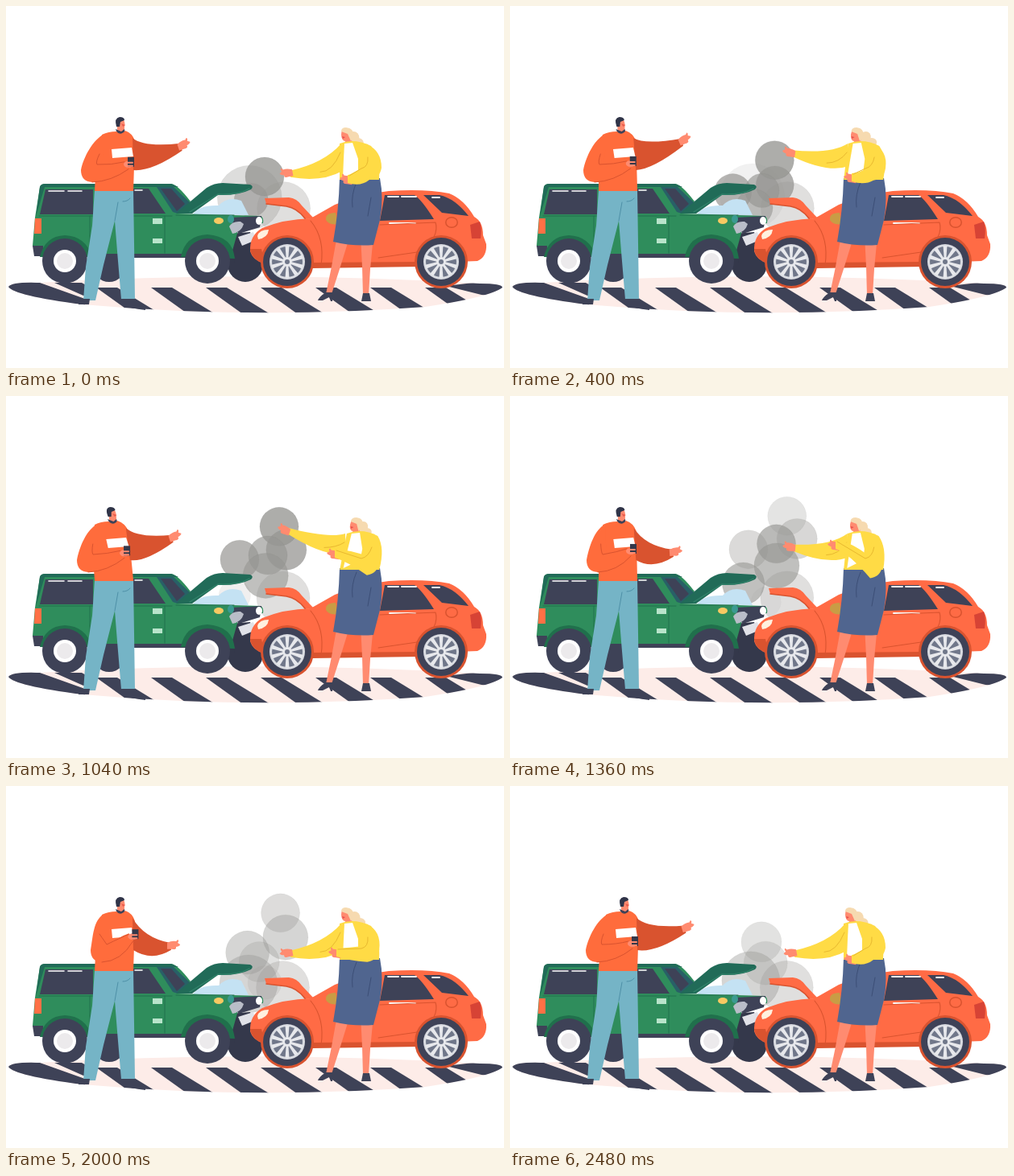
An HTML page with a canvas for the animation above (2.56 s loop, 618 px wide and 450 px high).

```html
<!DOCTYPE html>
<html lang="en">
<head>
<meta charset="utf-8">
<title>Roadside argument</title>
<style>
html, body { margin: 0; width: 100%; height: 100%; overflow: hidden; background: #fff; }
canvas { display: block; width: 618px; height: 450px; }
</style>
</head>
<body>
<canvas id="stage" width="618" height="450"></canvas>
<script>
const ctx = document.getElementById('stage').getContext('2d');
const LOOP = 2560, STEP = 80;
const DARK = '#3e4257', GREEN = '#2f8d5c', DEEP = '#216b58', RED = '#ff6b45';
const RUST = '#d9532f', SKIN = '#ff8b70', YELLOW = '#ffdb45', SWEATER = '#ff6c3c';
const HAIR = '#f6dab0';

function fill(color, path) {
  ctx.fillStyle = color;
  ctx.fill(new Path2D(path));
}
function line(color, width, path) {
  ctx.strokeStyle = color;
  ctx.lineWidth = width;
  ctx.lineCap = ctx.lineJoin = 'round';
  ctx.stroke(new Path2D(path));
}
function oval(color, x, y, rx, ry = rx) {
  ctx.fillStyle = color;
  ctx.beginPath();
  ctx.ellipse(x, y, rx, ry, 0, 0, 7);
  ctx.fill();
}
function within(transform, draw) {
  ctx.save();
  ctx.transform(...transform);
  draw();
  ctx.restore();
}
const place = (x, y, angle) =>
  [Math.cos(angle), Math.sin(angle), -Math.sin(angle), Math.cos(angle), x, y];
// Shear that keeps the waist still and moves the head sideways.
const lean = (dx, waist, height) => [1, 0, -dx / height, 1, dx * waist / height, 0];

const TIMES = [0, 400, 720, 1040, 1360, 2000, 2480];
const MAN = {
  tilt: [0, -5, -11, -11, -4.5, 0, 0],
  elbow: [93, 91, 89, 88, 95, 105, 94],
  handX: [228, 224, 220, 217, 213, 215, 228],
  handY: [171, 164, 156, 173, 194, 199, 174]
};
const LADY = {
  tilt: [0, 7, 11, 11, 6, 0, 0],
  handY: [210, 182, 159, 165, 188, 210, 210],
  restX: [416, 416, 414, 400, 396, 402, 416],
  restY: [216, 214, 210, 197, 186, 208, 216],
  swing: [1, 8, 9, 2, 1, 4, 2]
};

// Smooth curve through looping keys.
function tween(values, t) {
  const n = TIMES.length;
  const time = i => TIMES[(i + n) % n] + LOOP * Math.floor(i / n);
  const value = i => values[(i + n) % n];
  const slope = i => (value(i + 1) - value(i - 1)) / (time(i + 1) - time(i - 1));
  let i = n - 1;
  while (TIMES[i] > t) i--;
  const span = time(i + 1) - time(i), u = (t - time(i)) / span, v = 1 - u;
  return value(i) * v * v * (1 + 2 * u) + value(i + 1) * u * u * (3 - 2 * u)
    + span * u * v * (slope(i) * v - slope(i + 1) * u);
}
const poseAt = (keys, t) =>
  Object.fromEntries(Object.entries(keys).map(([name, values]) => [name, tween(values, t)]));

// birth, end, from x, from y, to x, to y, radius, opacity
const PUFFS = [
  [-600, 600, 305, 242, 300, 235, 40, .32],
  [-600, 3100, 345, 252, 343, 250, 33, .3],
  [-400, 320, 303, 246, 305, 238, 21, .95],
  [80, 1600, 318, 240, 362, 168, 25, .75],
  [-400, 1520, 313, 234, 346, 143, 24, .78],
  [40, 1600, 268, 250, 300, 182, 24, .7],
  [160, 2240, 308, 242, 344, 149, 24, .66],
  [240, 2320, 298, 258, 354, 178, 28, .6],
  [1000, 2320, 283, 250, 304, 196, 27, .6],
  [1300, 2960, 318, 260, 310, 172, 25, .28],
  [1600, 2960, 303, 250, 297, 238, 36, .4],
  [1900, 2960, 322, 250, 314, 200, 27, .28]
];

function smoke(t) {
  for (const [birth, end, x0, y0, x1, y1, size, opacity] of PUFFS) {
    if (t <= birth || t >= end) continue;
    const age = t - birth, u = age / (end - birth), e = u * (1.2 - .2 * u);
    const alpha = opacity * Math.min(1, age / 160, (end - t) / 480);
    const r = size * Math.min(1, .7 + .3 * age / 400);
    oval(`rgba(151,150,147,${alpha})`, x0 + (x1 - x0) * e, y0 + (y1 - y0) * e, r);
    ctx.strokeStyle = `rgba(130,129,126,${alpha * .35})`;
    ctx.lineWidth = .7;
    ctx.stroke();
  }
}

function road() {
  const shape = 'M3 349Q7 343 40 344Q310 328 588 345Q616 345 616 350Q600 362 520 374Q310 390 95 371Q10 360 3 349Z';
  fill('#fdece8', shape);
  ctx.save();
  ctx.clip(new Path2D(shape));
  fill(DARK, 'M0 340L42 344L98 364V375L0 365ZM60 344H94L108 352V359L96 360ZM546 348L580 344L620 345V362L590 359Z');
  for (let x = 112; x < 560; x += 68) fill(DARK, `M${x} 350h26l54 33h-34Z`);
  ctx.restore();
}

function plainWheel(x, y) {
  oval(DARK, x, y, 28);
  oval('#fff', x, y, 14);
  oval('#eceaec', x, y, 10);
}

function alloyWheel(x, y) {
  oval(RUST, x, y, 33);
  oval(DARK, x, y, 30);
  oval('#d9dbe1', x, y, 22);
  oval('#70778a', x, y, 19);
  for (let i = 0; i < 10; i++) {
    within(place(x, y, i * Math.PI / 5), () => fill('#e7e8ec', 'M-1 0L-2.5 -20H2.5L1 0Z'));
  }
  oval('#e7e8ec', x, y, 6);
  oval('#70778a', x, y, 3);
}

function greenCar() {
  oval(DARK, 128, 322, 21);
  oval('#34384b', 297, 321, 22);
  fill('#34384b', 'M277 283L303 281L318 320H284Z');
  fill('#c4e2f3', 'M232 259Q240 247 264 248Q275 236 292 242L301 260Z');
  fill(GREEN, 'M42 225Q43 221 49 221H205Q213 222 229 243L213 258L316 261Q320 263 319 270L290 272L281 304L277 312H45L33 298L36 263Z');
  fill(DEEP, 'M42 225Q43 221 49 221H205L214 225H48L37 262Z');
  fill(DARK, 'M49 228H108V259H42ZM152 227H177L198 258H152Z');
  fill('#286067', 'M187 225H208L229 245L213 258L207 256Z');
  fill(DARK, 'M192 227H205L222 246L212 255Z');
  line('#fff', 1.6, 'M53 230H72M77 230H94M160 229H169');
  line('#20704c', 1, 'M41 261H206M197 261V307M104 261V307M211 260H283');
  fill('#b8e4cb', 'M182 264h12v7h-12ZM182 289h12v6h-12Z');
  fill('#ff7045', 'M36 264H44V283H35Z');
  fill(DARK, 'M33 298H46V311H35ZM102 308H225V313H102Z');
  fill('#20704c', 'M42 312Q48 286 73 285Q99 286 107 312ZM217 312Q222 285 250 284Q281 286 284 314Z');
  plainWheel(73, 317);
  plainWheel(250, 317);
  fill(DARK, 'M281 263L317 261L315 275L289 283L281 274Z');
  oval('#f8c962', 264, 267, 6, 4);
  oval('#3b9a91', 279, 265, 4, 5);
  oval('#fff', 314, 267, 4, 5);
  fill('#b9bdc8', 'M277 274Q281 267 291 268L295 271Q292 281 281 283Z');
  fill('#e1e2e8', 'M288 287L307 281L310 291L293 298Z');
  fill(DEEP, 'M211 258L249 226Q258 220 269 220L303 222Q308 224 304 228Q288 236 263 235L231 258Z');
  line('#31836a', 1.4, 'M228 256L263 234Q288 235 302 227');
}

function redCar() {
  fill(RED, 'M303 305Q302 285 318 276Q345 265 378 264L408 247Q440 234 475 230Q520 227 550 233Q568 240 581 262Q592 268 592 285L596 296Q597 312 585 317L380 325L320 320Q306 316 303 305Z');
  fill(RED, 'M321 239L351 238Q361 239 367 248L382 264L371 265Q362 251 348 249L323 246Z');
  line(RUST, 1.6, 'M323 246L348 249Q361 251 371 264');
  fill(DARK, 'M470 235H507Q516 241 531 265L464 267ZM518 235H538Q557 239 574 261L541 257Z');
  line('#fff', 1.8, 'M474 237H487M491 237H509M476 270H508M529 238H538');
  line(RUST, 1.1, 'M464 272L533 269Q538 285 517 305L462 313M378 267Q396 289 391 322');
  oval(RUST, 553, 269, 8, 7);
  oval(RED, 553, 269, 6.5, 5.5);
  fill('#d74335', 'M576 272L588 268Q591 277 589 289H578Z');
  fill(RUST, 'M379 319L513 318V324L380 326ZM303 302H317L321 320Q305 316 303 302Z');
  fill('#fff1df', 'M312 286Q314 278 326 278Q325 288 313 290Z');
  alloyWheel(349, 318);
  alloyWheel(540, 318);
  fill('#c99c45', 'M397 263Q398 257 409 257L412 271Q401 273 397 266Z');
}

function hand(x, y, angle, flip = 1) {
  within(place(x, y, angle), () => {
    ctx.scale(1, flip);
    fill(SKIN, 'M-15 -4Q-9 -7 -4 -6L-2 -8Q0 -7 -2 -4L1 -2Q1 0 -4 1Q-3 5 -9 4H-15Z');
  });
}

function man({ tilt, elbow, handX, handY }) {
  fill('#75b4c6', 'M110 229H158L159 295L160 365H143L138 305L135 267L121 322L111 366H96L99 324L107 273Z');
  line('#4e90a7', 1, 'M135 267L139 244M154 239Q151 243 145 243');
  fill(DARK, 'M96 364H104L103 371H90Q90 367 96 364ZM143 364H160L173 374V378Q154 376 143 371Z');
  const sx = tilt * .75, ey = 109 + .45 * handY;
  const angle = Math.atan2(handY - ey, handX - 183 - sx);
  within(lean(tilt, 229, 84), () => {
    fill(SKIN, 'M138 148H147V159H138Z');
    oval(SKIN, 143, 147, 4.5, 7);
    fill('#303448', 'M137 150Q134 139 141 138Q147 138 147 142L142 144L141 150Z');
    fill('#e95c4d', 'M143 146L148 148L145 150Z');
    fill(DARK, 'M136 153L143 156L147 153L148 160L139 161Z');
    fill(SWEATER, 'M119 160Q127 156 137 156Q142 162 148 155Q157 158 160 168L158 230H110L112 190Z');
  });
  const wx = handX - 12 * Math.cos(angle), wy = handY - 12 * Math.sin(angle);
  fill(RUST, `M${157 + sx} 164Q${171 + sx} ${ey - 10} ${wx} ${wy - 4}L${wx + 2} ${wy + 5}Q${181 + sx} ${ey + 20} ${158 + sx * .5} 204Z`);
  hand(handX, handY, angle);
  within(lean(tilt, 229, 84), () => fill('#fff', 'M131 178L156 176L158 187L132 189Z'));

  const px = 155 + tilt * .45 + Math.max(0, elbow - 96) * .6;
  const py = 193 + tilt * .5 - (elbow - 94) * .8;
  fill(SWEATER, `M${122 + sx} 159C${108 + sx} 166 ${elbow + 3} 188 ${elbow} 204Q${elbow} 218 ${elbow + 14} 219Q${elbow + 38} 218 ${px - 3} ${py + 9}L${px - 8} ${py - 1}Q${elbow + 33} ${py + 4} ${elbow + 25} 197L${122 + sx} 179Z`);
  line(RUST, 1, `M${116 + sx} 184Q${elbow + 18} 194 ${elbow + 20} 197Q${elbow + 38} ${py + 4} ${px - 8} ${py}M${elbow + 14} 219Q${elbow + 38} 218 ${px - 3} ${py + 9}`);
  oval(SKIN, px - 3, py + 3, 6, 4);
  ctx.fillStyle = '#353849';
  ctx.fillRect(px - 4, py - 6, 8, 12);
  line(SKIN, 2, `M${px - 5} ${py + 1}h7m-6 4h6`);
}

function lady({ tilt, handY, restX, restY, swing }) {
  fill(SKIN, 'M411 285H427L414 327L404 358H397L404 324ZM440 285H456L452 327L450 359H443L442 324Z');
  fill(DARK, 'M397 356H406L405 367H403L401 362L393 366H387Q389 361 397 356ZM443 357H451L453 367H441Z');
  fill('#50658f', 'M414 214H464Q469 239 464 266L456 297Q430 299 406 293Q413 254 414 214Z');
  line('#3c4e76', 1, 'M435 219Q428 235 430 250M453 238L449 261');
  const sx = tilt * .45, handX = 341 - tilt * .3;
  const ey = 181 + (handY - 159) * .4;
  within(lean(tilt, 217, 57), () => {
    oval(HAIR, 431 + swing * .4, 164, 7, 8);
    oval(HAIR, 436 + swing * .8, 170, 7, 6);
    fill(SKIN, 'M419 159H428L430 174H422Z');
    oval(SKIN, 421, 160, 5, 8);
    fill(HAIR, 'M416 156Q416 151 422 151Q432 152 432 162L428 168L424 159Z');
    fill('#e94f4b', 'M417 162L421 163L418 165Z');
    fill(YELLOW, 'M414 171Q432 164 453 174Q465 189 463 216H414Z');
    fill('#fff', 'M420 171L430 170L437 190V204L418 214L419 190Z');
  });
  const wx = handX + 12, wy = handY + (ey - handY) * .14;
  fill(YELLOW, `M${416 + sx} 171Q${395 + sx} ${ey - 6} ${wx - 1} ${wy - 4}L${wx} ${wy + 4}Q${392 + sx} ${ey + 18} ${417 + sx} ${194 + (handY - 159) * .22}Z`);
  line('#e8b82f', 1, `M${415 + sx} 182Q${405 + sx} ${ey + 5} ${390 + sx} ${ey + 5}`);
  hand(handX, handY, Math.atan2(handY - ey, handX - 388 - sx), -1);

  const ex = 466 - (416 - restX) * .2, by = 201 + (216 - restY) * .35;
  hand(restX - 1, restY, Math.PI + .15, -1);
  fill(YELLOW, `M${448 + sx} 172Q${466 + sx} 180 ${ex} ${by}Q${ex - 2} ${by + 13} ${ex - 15} ${by + 15}Q${restX + 24} ${restY + 9} ${restX + 8} ${restY + 4}v-10Q${restX + 24} ${restY - 7} ${443 + sx} 199Z`);
  line('#e8b82f', 1, `M${449 + sx} 188Q450 200 441 202L${restX + 10} ${restY - 5}`);
}

function draw(now) {
  const t = Math.floor(now % LOOP / STEP) * STEP;
  ctx.fillStyle = '#fff';
  ctx.fillRect(0, 0, 618, 450);
  road();
  smoke(t);
  greenCar();
  redCar();
  man(poseAt(MAN, t));
  lady(poseAt(LADY, t));
}

let start;
function frame(now) {
  start ??= now;
  draw(now - start);
  requestAnimationFrame(frame);
}
draw(0);
requestAnimationFrame(frame);
</script>
</body>
</html>
```
